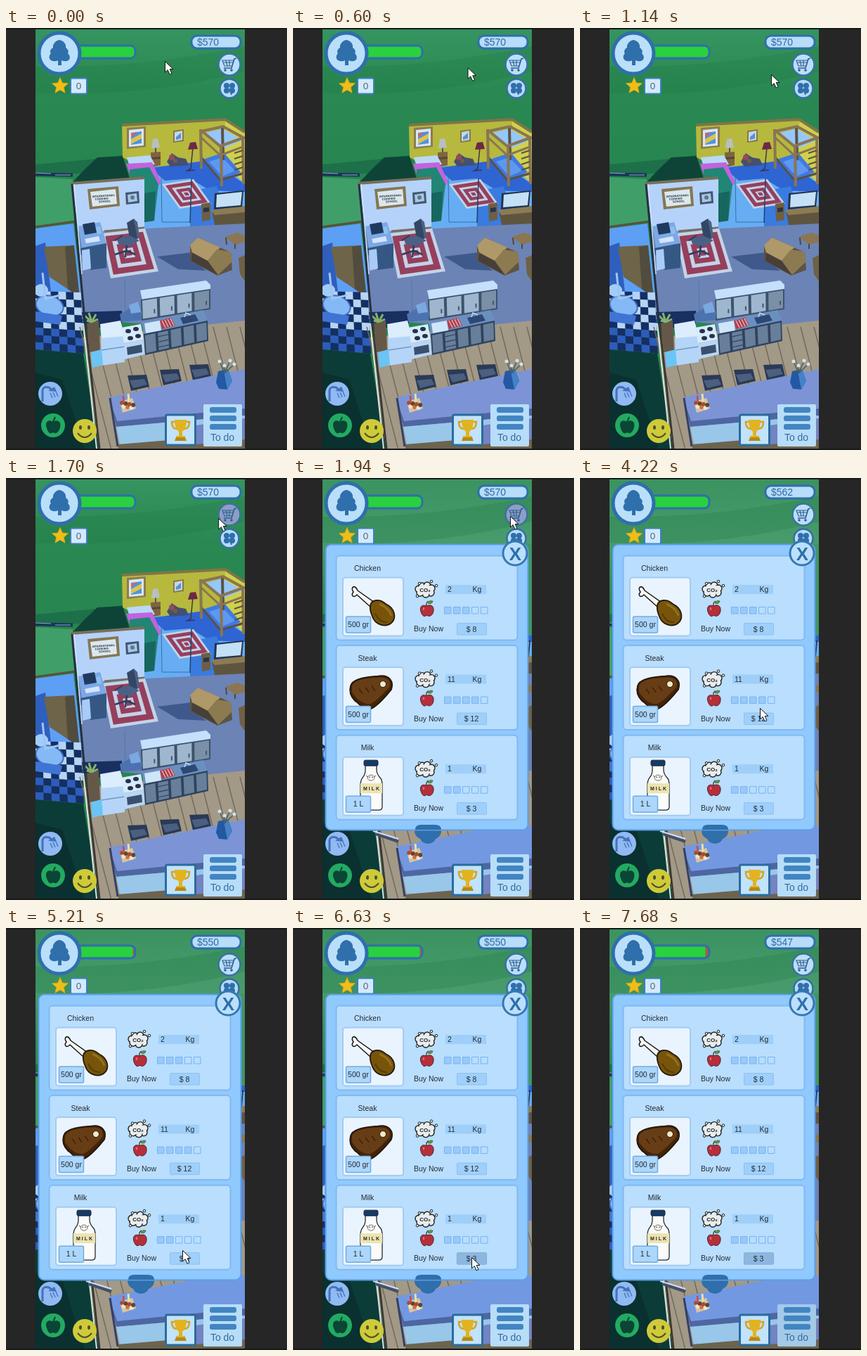
These frames come from a looping animation (400 px wide and 600 px high, 8200 ms). An HTML page with a canvas:

```html
<!DOCTYPE html>
<html lang="en">
<head>
<meta charset="utf-8">
<title>House shop</title>
<style>
html, body { margin: 0; width: 100%; height: 100%; overflow: hidden; background: #262626; }
canvas { display: block; width: 400px; height: 600px; }
</style>
</head>
<body>
<canvas id="stage" width="400" height="600"></canvas>
<script>
const c = document.getElementById('stage').getContext('2d');
const LOOP = 8200, OPEN_AT = 1850;
const BLUE = '#2f6fab', PALE = '#b7ddfb';

// --- drawing helpers ---
function poly(fill, ...p) {
  c.beginPath();
  for (let i = 0; i < p.length; i += 2) c.lineTo(p[i], p[i + 1]);
  c.closePath();
  c.fillStyle = fill;
  c.fill();
}
function line(color, width, ...p) {
  c.beginPath();
  for (let i = 0; i < p.length; i += 2) c.lineTo(p[i], p[i + 1]);
  c.strokeStyle = color;
  c.lineWidth = width;
  c.stroke();
}
function paint(fill, stroke, width) {
  if (fill) { c.fillStyle = fill; c.fill(); }
  if (stroke) { c.strokeStyle = stroke; c.lineWidth = width; c.stroke(); }
}
function box(x, y, w, h, r, fill, stroke, width) {
  c.beginPath();
  c.roundRect(x, y, w, h, r);
  paint(fill, stroke, width);
}
function oval(x, y, rx, ry, fill, stroke, width, turn = 0) {
  c.beginPath();
  c.ellipse(x, y, rx, ry, turn, 0, 7);
  paint(fill, stroke, width);
}
const disc = (x, y, r, fill, stroke, width) => oval(x, y, r, r, fill, stroke, width);
function shape(d, fill, stroke, width) {
  const p = new Path2D(d);
  if (fill) { c.fillStyle = fill; c.fill(p); }
  if (stroke) { c.strokeStyle = stroke; c.lineWidth = width; c.stroke(p); }
}
function text(s, x, y, size, color = '#252b33', align = 'left', weight = '') {
  c.font = `${weight} ${size}px "Liberation Sans", Arial, sans-serif`;
  c.textAlign = align;
  c.fillStyle = color;
  c.fillText(s, x, y);
}
// Maps the unit square onto a four-cornered face: corners clockwise from top left.
function face(ax, ay, bx, by, cx, cy, dx, dy) {
  const at = (u, v) => [
    (1 - v) * (ax + (bx - ax) * u) + v * (dx + (cx - dx) * u),
    (1 - v) * (ay + (by - ay) * u) + v * (dy + (cy - dy) * u)];
  return (fill, u0 = 0, v0 = 0, u1 = 1, v1 = 1) =>
    poly(fill, ...at(u0, v0), ...at(u1, v0), ...at(u1, v1), ...at(u0, v1));
}
function rug(f) {
  ['#c3d3e8', '#963f5c', '#c3d3e8', '#963f5c', '#c3d3e8', '#8f4160']
    .forEach((col, i) => { const k = [0, .07, .2, .28, .39, .44][i]; f(col, k, k, 1 - k, 1 - k); });
}

// --- the house ---
function lawn(open) {
  const g = c.createLinearGradient(0, 2, 0, 210);
  g.addColorStop(0, open ? '#3b9360' : '#369460');
  g.addColorStop(.42, open ? '#489b6c' : '#2a8852');
  g.addColorStop(1, '#278550');
  c.fillStyle = g;
  c.fillRect(42, 2, 298, 596);
  shape('M42 55Q190 58 340 26V62Q190 100 42 92Z', 'rgba(28,115,65,.25)');
  poly('#1d7049', 42, 194, 118, 187, 166, 181, 172, 206, 42, 208);
  poly('#0e4437', 111, 202, 130, 184, 166, 182, 176, 214, 95, 219);
  poly('#409f68', 42, 212, 95, 215, 98, 274, 42, 281);
  line('#1c3558', 5, 42, 208, 95, 209);
  line('#8faec9', 1, 42, 206, 64, 207);
  line('#8faec9', 1, 70, 209, 92, 209);
}
function bedroom() {
  poly('#b6b93d', 165, 138, 312, 130, 312, 196, 208, 206, 166, 184);
  poly('#d0d04d', 312, 130, 340, 148, 340, 235, 312, 200);
  line('#7f7547', 4, 165, 138, 312, 130, 340, 148);
  poly('#67adf3', 204, 197, 310, 193, 340, 222, 340, 285, 194, 288, 194, 212);
  poly('#2f64d3', 205, 199, 290, 188, 340, 222, 340, 233, 290, 231, 262, 214, 226, 217);
  poly('#3a7be0', 262, 232, 300, 225, 318, 282, 262, 282);
  rug(face(222, 222, 267, 215, 292, 250, 247, 257));
  // pictures
  poly('#8d7c50', 172, 142, 199, 140, 199, 169, 172, 172);
  poly('#d9e7f5', 175, 145, 196, 143, 196, 167, 175, 169);
  poly('#4d94dc', 178, 149, 193, 147, 193, 164, 178, 166);
  poly('#e0c24e', 178, 158, 193, 150, 193, 157, 178, 165);
  poly('#d76459', 178, 150, 187, 148, 178, 156);
  poly('#89794c', 238, 146, 253, 144, 253, 161, 238, 163);
  poly('#c5d7e6', 240, 148, 251, 146, 251, 159, 240, 161);
  poly('#5794cb', 242, 155, 249, 149, 249, 157, 242, 159);
  // lamps, night stand and toys
  poly('#7d6440', 206, 177, 220, 176, 220, 195, 207, 198);
  poly('#594733', 207, 184, 220, 183, 220, 186, 207, 187);
  line('#4d5560', 2, 213, 170, 213, 177);
  poly('#b9bfc0', 209, 158, 216, 157, 219, 170, 207, 171);
  line('#3b3550', 1.5, 266, 170, 263, 200, 258, 203, 269, 202);
  poly('#6e2845', 262, 163, 270, 162, 273, 172, 259, 173);
  poly('#43506e', 229, 190, 236, 178, 245, 184, 256, 186, 260, 195, 234, 197);
  disc(236, 184, 4, '#944a5b');
  disc(241, 189, 3, '#785a42');
  // bed
  poly('#b9d8f7', 172, 184, 205, 181, 212, 194, 176, 197);
  poly('#c263df', 171, 193, 208, 191, 221, 219, 215, 227, 205, 203, 176, 208);
  poly('#218675', 176, 201, 204, 198, 217, 222, 211, 274, 197, 276, 197, 214, 176, 210);
  poly('#17665f', 197, 235, 213, 232, 211, 274, 197, 276);
  line('#3272a8', 1, 221, 210, 222, 276, 262, 276);
  line('#23406a', 1.5, 264, 215, 262, 277);
  // bunk bed
  poly('#95c7fa', 281, 150, 308, 143, 336, 160, 309, 172);
  poly('#3f79e2', 280, 187, 310, 177, 334, 205, 305, 218);
  poly('#5e98ef', 289, 190, 308, 184, 326, 203, 308, 211);
  const wood = '#8a7552', dark = '#5b5145';
  line(dark, 4, 308, 141, 309, 188);
  line(wood, 4, 277, 145, 305, 168, 338, 156, 309, 140, 277, 147);
  line(wood, 3, 278, 156, 305, 181, 337, 169);
  line(dark, 3, 278, 184, 305, 216, 337, 207);
  for (const [x, y, b] of [[277, 144, 200], [306, 166, 225], [337, 154, 222]]) line(wood, 4, x, y, x + 1, b);
  for (let y = 178; y < 216; y += 8) line(dark, 2, 325, y, 337, y - 4);
  // television
  poly('#5f553f', 293, 261, 340, 255, 340, 279, 298, 284);
  poly('#8c7b53', 291, 259, 340, 253, 340, 262, 297, 266);
  poly('#22334c', 297, 235, 338, 231, 336, 254, 296, 258);
  poly('#c4e0f7', 300, 237, 336, 233, 334, 252, 299, 255);
  poly('#6d5f45', 278, 250, 291, 248, 291, 273, 279, 275);
  poly('#26354b', 281, 256, 289, 255, 289, 261, 281, 262);
}
function bathroom() {
  poly('#5d9ff5', 42, 285, 96, 278, 108, 385, 42, 390);
  poly('#2f5fbd', 42, 310, 56, 305, 65, 385, 42, 390);
  line('#5c5139', 3, 42, 283, 98, 275);
  poly('#6d6449', 54, 311, 96, 309, 104, 382, 62, 354);
  poly('#514c3e', 84, 311, 97, 309, 105, 384, 88, 371);
  const floor = face(42, 374, 107, 376, 111, 463, 42, 457);
  for (let i = 0; i < 6; i++) for (let j = 0; j < 8; j++)
    floor((i + j) % 2 ? (j > 4 ? '#2d5cbd' : '#b7d4f4') : '#152e63', i / 6, j / 8, (i + 1) / 6, (j + 1) / 8);
  oval(62, 395, 20, 14, '#85b9f5', '#456fc0', 2, .3);
  poly('#3f74d4', 42, 403, 80, 409, 77, 422, 42, 417);
  oval(50, 373, 10, 9, '#a3cdf9');
  line('#9cc6f3', 3, 52, 348, 56, 385, 77, 380);
  poly('#0c3c38', 42, 457, 110, 463, 132, 598, 42, 598);
  poly('#0a302f', 42, 490, 80, 500, 112, 598, 42, 598);
}
function office() {
  poly('#6c83b6', 104, 290, 340, 278, 340, 432, 108, 414);
  poly('#40598c', 215, 325, 265, 319, 270, 333, 285, 345, 245, 343);
  poly('#b5d3fa', 93, 221, 197, 213, 197, 287, 104, 290);
  line('#77705c', 4, 92, 221, 197, 213);
  line('#77705c', 3, 140, 289, 197, 284);
  poly('#857753', 116, 229, 160, 225, 162, 253, 119, 258);
  poly('#dce8ef', 120, 233, 156, 229, 158, 250, 123, 254);
  c.save();
  c.translate(139, 240);
  c.rotate(-.07);
  text('INTERNATIONAL', 0, 0, 4, '#1e2b35', 'center', 'bold');
  text('COOKING', -3, 4, 4, '#1e2b35', 'center', 'bold');
  text('SCHOOL', 1, 8, 4, '#1e2b35', 'center', 'bold');
  c.restore();
  poly('#435772', 170, 234, 189, 232, 190, 249, 171, 251);
  poly('#a8c7e1', 173, 237, 186, 235, 187, 246, 174, 248);
  disc(180, 241, 3, '#5c7894');
  rug(face(136, 292, 198, 285, 217, 346, 149, 356));
  // desk
  poly('#7ca8e6', 103, 282, 134, 276, 143, 306, 108, 313);
  poly('#355784', 106, 313, 143, 306, 143, 341, 120, 344, 117, 320, 107, 323);
  poly('#a8cbf7', 108, 316, 119, 314, 121, 342, 109, 345);
  poly('#20395f', 109, 279, 126, 276, 129, 291, 112, 294);
  poly('#d3e5fa', 112, 300, 132, 296, 134, 303, 114, 306);
  poly('#8dc0ee', 128, 283, 134, 282, 136, 292, 130, 293);
  // desk chair
  poly('#334665', 172, 277, 182, 271, 188, 299, 177, 304);
  poly('#4b6183', 182, 271, 187, 276, 190, 297, 187, 300);
  poly('#4a6186', 158, 300, 175, 295, 190, 302, 175, 311, 160, 307);
  line('#2d3d5b', 2.5, 172, 309, 171, 317, 155, 322);
  line('#2d3d5b', 2.5, 184, 322, 171, 316, 170, 326);
  line('#2d3d5b', 2, 155, 302, 166, 295);
  // armchair and tables
  poly('#5c5444', 262, 310, 273, 298, 320, 319, 322, 344, 301, 352, 262, 331);
  poly('#b09968', 262, 309, 273, 298, 305, 312, 295, 322, 287, 331, 265, 319);
  poly('#8c7a51', 287, 331, 300, 315, 320, 318, 322, 332, 302, 351);
  poly('#473f38', 265, 320, 287, 331, 301, 351, 264, 331);
  poly('#8a7650', 312, 297, 329, 291, 340, 295, 340, 304, 326, 308);
  line('#51483a', 2, 313, 298, 314, 308);
  line('#51483a', 2, 326, 307, 326, 314);
  poly('#6f6145', 331, 327, 340, 323, 340, 360, 333, 350);
}
function kitchen(open) {
  // planks
  const floor = face(110, 440, 340, 416, 340, 600, 132, 600);
  floor('#a39987');
  for (let x = 110; x < 350; x += 19) line('#736a5e', 1.5, x - 5, 425, x + 40, 600);
  poly('#182f60', 108, 404, 165, 402, 165, 420, 112, 430);
  // wall cupboards
  poly('#c4e0fc', 191, 373, 285, 359, 291, 365, 291, 373, 194, 387);
  const cupboard = face(192, 386, 291, 371, 291, 400, 193, 416);
  cupboard('#3e526d');
  for (let i = 0; i < 4; i++) cupboard(i === 3 ? '#7990a6' : '#9eb7cf', i / 4 + .02, .06, i / 4 + .23, .93);
  for (let i = 0; i < 4; i++) cupboard('#40566f', i / 4 + .18, .55, i / 4 + .2, .75);
  line('#4f79ae', 1, 169, 358, 170, 408);
  poly('#4c73af', 162, 407, 179, 397, 194, 404, 193, 415, 164, 418);
  poly('#7aa9e2', 175, 394, 188, 389, 192, 404, 178, 406);
  // worktop and units
  poly('#dcedfe', 134, 421, 163, 416, 169, 439, 136, 445);
  poly('#b4d5f8', 135, 441, 169, 438, 169, 475, 136, 480);
  line('#7199c4', 1.5, 136, 458, 169, 453);
  poly('#d8eafa', 164, 426, 192, 421, 196, 443, 168, 448);
  for (const [x, y] of [[174, 431], [185, 428], [177, 441], [188, 438]]) oval(x, y, 4, 3, '#24334d');
  poly('#b9d6f2', 168, 448, 196, 443, 198, 464, 169, 471);
  poly('#3a506f', 172, 454, 193, 450, 194, 461, 173, 465);
  poly('#6a90c1', 193, 418, 281, 401, 287, 416, 196, 435);
  const unit = face(196, 435, 287, 416, 288, 445, 198, 465);
  unit('#2f435d');
  for (let i = 0; i < 5; i++) unit('#687f9b', i / 5 + .02, .08, i / 5 + .18, .92);
  for (let i = 1; i < 4; i++) unit('#2f435d', .22, i * .25, .38, i * .25 + .04);
  poly('#cfe6fa', 197, 420, 219, 416, 221, 430, 199, 434);
  poly('#b43f4d', 219, 416, 235, 412, 241, 423, 222, 428);
  for (let i = 0; i < 4; i++) line('#edf1ee', 1, 222 + i * 4, 416 - i, 227 + i * 4, 426 - i);
  poly('#2d4873', 248, 412, 269, 407, 274, 416, 252, 421);
  line('#bed6ee', 1.5, 254, 411, 256, 405, 263, 408);
  // plant, box and outer wall
  poly('#665848', 115, 420, 132, 416, 134, 458, 119, 461);
  poly('#6bc4f6', 121, 461, 136, 457, 138, 479, 123, 483);
  for (const [x, y] of [[112, 409], [118, 405], [128, 407], [131, 414], [115, 416]])
    line('#86b26a', 3, 122, 418, x, y);
  line('#dce5df', 2, 110, 420, 129, 598);
  line('#3b3934', 3, 113, 420, 133, 598);
  line('#253044', 3, 94, 222, 112, 415);
  line('#d0e2f5', 1.5, 97, 222, 108, 350);
  // bar
  if (!open) {
    for (const [x, y] of [[173, 494], [219, 486], [261, 479]]) {
      poly('#2a3a56', x, y, x + 27, y - 1, x + 31, y + 16, x + 5, y + 22);
      poly('#4b6080', x + 3, y + 7, x + 24, y + 5, x + 28, y + 13, x + 8, y + 18);
    }
    poly('#7c94d5', 147, 525, 340, 485, 340, 541, 158, 559);
  } else {
    poly('#7398e2', 147, 524, 262, 501, 340, 494, 340, 541, 158, 559);
    line('#42506e', 4, 118, 506, 150, 517);
    line('#d2dcf0', 2, 114, 502, 150, 513);
  }
  poly('#4d66a4', 147, 526, 158, 559, 340, 541, 340, 551, 157, 567);
  poly('#98c7e9', 157, 567, 340, 551, 340, 578, 162, 592);
  line('#354064', 3, 148, 526, 159, 595);
  poly('#6d634f', 160, 592, 340, 577, 340, 598, 160, 598);
  poly('#7383c3', 270, 565, 340, 555, 340, 585, 270, 592);
  // snack basket
  poly('#d7c5a0', 162, 531, 180, 526, 185, 541, 166, 547);
  for (let i = 0; i < 7; i++)
    disc(165 + i * 2.7, 533 + (i * 5 % 9), 3, ['#a84a3b', '#ede4cb', '#594734', '#d36f3c'][i % 4]);
  line('#ca4b44', 2.5, 167, 523, 168, 533);
  line('#eadf9f', 3, 174, 520, 175, 531);
  if (!open) {
    poly('#2458a3', 302, 488, 316, 485, 322, 502, 315, 514, 303, 513, 299, 504);
    poly('#4481c9', 310, 488, 316, 485, 322, 502, 315, 514);
    for (const [x, y] of [[304, 474], [311, 480], [319, 473], [325, 478]]) {
      line('#475f65', 1.5, 311, 491, x, y);
      disc(x, y, 2.5, '#d3e3e9');
    }
  }
}
function house(open) {
  lawn(open);
  bedroom();
  bathroom();
  office();
  kitchen(open);
  if (open) poly('#419664', 333, 94, 340, 94, 340, 224, 333, 224);
}

// --- screen controls ---
function hud(s) {
  box(100, 25, 84, 18, 7, '#a65d43');
  box(100, 25, s.bar - 100, 18, [7, 4, 4, 7], '#29d13f');
  box(100, 25, 84, 18, 7, null, BLUE, 3);
  disc(76, 36, 29, '#b9dffa', BLUE, 5);
  shape('M76 17C70 18 66 24 67 28C63 30 62 34 64 36C60 40 61 46 67 47Q71 48 74 46V53H79V46Q86 49 90 45C92 41 90 38 88 36C90 33 88 30 85 28C86 23 82 18 76 17Z', BLUE);
  box(264, 11, 70, 18, 8, PALE, BLUE, 3);
  text('$' + s.money, 272, 25, 14, '#326a9e');

  disc(318, 52, 15.5, s.cart ? '#8c9fc3' : '#badffa', '#3b70a2', 2.5);
  line('#315f92', 1.7, 328, 43, 325, 44, 321, 57, 310, 57);
  shape('M325 46H308L311 54H322M310 49H324M313 46L315 54M318 46V54', null, '#315f92', 1.2);
  disc(312, 60, 1.8, '#315f92');
  disc(321, 60, 1.8, '#315f92');
  disc(318, 86, 13.5, '#b5dbf8', '#356fa4', 2.5);
  for (const [x, y] of [[314, 82], [322, 82], [314, 89], [322, 89]]) disc(x, y, 4, BLUE);
  line(BLUE, 2, 318, 86, 321, 95);

  c.beginPath();
  for (let i = 0; i < 10; i++) {
    const a = i * Math.PI / 5 - Math.PI / 2, r = i % 2 ? 5.5 : 12;
    c.lineTo(77 + r * Math.cos(a), 82.5 + r * Math.sin(a));
  }
  c.closePath();
  paint('#efbe18', '#d5a417', 1);
  box(92, 71.5, 23, 22, 2, '#d3eafd', '#3b80bd', 2);
  text('0', 103.5, 87, 13.5, '#53697c', 'center');

  disc(63, 520, 17, '#91b9f3');
  shape('M52 531V515Q53 509 61 511L65 514', null, '#4373ba', 3);
  poly('#4373ba', 60, 516, 69, 510, 72, 517);
  for (let i = 0; i < 3; i++) line('#4373ba', 1.3, 63 + i * 4, 519 - i, 66 + i * 4, 526 - i);
  disc(67, 565, 17, '#23aa62');
  shape('M67 560C59 555 55 562 58 569C61 578 64 577 67 575C71 578 75 575 77 568C79 559 73 556 67 560Z', '#0b4535');
  line('#0b4535', 2, 67, 560, 70, 553);
  disc(112, 573, 17, '#cfca39');
  oval(106, 568, 2, 3, '#4b522b');
  oval(118, 568, 2, 3, '#4b522b');
  shape('M102 576Q112 588 122 576', null, '#4b522b', 2);

  box(227.5, 550, 42, 43, 2, '#c1e3fc', '#2b6c9d', 3);
  shape('M241 560H236Q236 570 244 570M256 560H261Q261 570 253 570', null, '#d6a51f', 2.5);
  shape('M240 557H257Q257 570 251 574V580H255V585H242V580H246V574Q240 569 240 557Z', '#e2b321');
  poly('#b78a17', 242, 582, 255, 582, 257, 587, 240, 587);
  box(281, 535, 55, 60, 2, s.todo ? '#a3cae7' : '#b7ddf8');
  for (let i = 0; i < 3; i++) box(290, 539 + i * 12, 38, 8, 3, '#4285c2');
  text('To do', 308, 587, 14, '#356c9d', 'center');
}

// --- shop ---
function cloud() {
  const puffs = [[179, 158, 5], [184, 154, 5], [191, 153, 5], [197, 157, 5], [196, 163, 5], [189, 165, 5], [181, 163, 5]];
  for (const [x, y, r] of puffs) disc(x, y, r, '#e9edee', '#222', 1.4);
  oval(188, 159, 12, 7, '#e9edee');
  text('CO₂', 188, 162, 8, '#222', 'center', 'bold');
  for (const [x, y] of [[180, 150], [197, 147], [204, 153], [177, 168]]) disc(x, y, 1.8, '#dfe7e9', '#222', 1);
}
function apple() {
  shape('M190 182C183 179 180 184 182 190C184 197 188 198 190 195C194 198 199 196 200 189C201 182 196 179 190 182Z', '#b62f3b', '#4d2330', 1);
  shape('M190 182Q189 177 193 175', null, '#4b3527', 1.3);
  shape('M192 178Q194 173 199 175Q198 180 192 178Z', '#5e9a39', '#355a28', .7);
  oval(186, 186, 1.2, 2, '#da7779');
}
function chicken() {
  shape('M92 160L116 177L111 184L91 166C86 171 82 167 86 162C81 156 88 150 92 160Z', '#f7f7f4', '#171717', 1.5);
  shape('M110 181C112 173 123 171 132 179C145 185 148 199 140 206C132 213 117 209 113 197Q109 188 110 181Z', '#775409', '#22190d', 1.8);
  shape('M123 179Q137 185 140 196', null, '#92701f', 3);
  shape('M117 193Q123 206 134 205', null, '#573c07', 2);
}
function steak() {
  shape('M82 168C84 158 102 155 121 154C137 151 144 162 140 173C132 183 120 197 110 201C98 204 97 194 88 189C81 182 80 175 82 168Z', '#432409', '#24160c', 1.8);
  shape('M84 168C89 158 107 157 123 156C136 155 140 163 137 170C128 179 118 191 109 194C97 194 89 184 84 177Z', '#673d16');
  disc(128, 165.5, 4.5, '#eee7c9', '#34200d', 1);
  for (let i = 0; i < 3; i++) line('#3c210b', 1.5, 94 + i * 9, 172 - i * 2, 99 + i * 9, 179 - i * 2);
}
function milk() {
  shape('M103 153H119V160Q119 166 125 172Q127 175 127 182V212Q127 217 122 217H101Q96 217 96 212V182Q96 175 99 171Q103 166 103 160Z', '#fbfbf9', '#252b30', 1.3);
  box(101, 146, 20, 8, 2, '#173a65', '#152942', 1);
  poly('#ece3b0', 96, 179, 127, 179, 127, 193, 96, 193);
  text('M I L K', 111.5, 189, 7, '#24282b', 'center', 'bold');
  oval(111, 171, 5, 4, '#f6f6f2', '#4d5355', .8);
  disc(109, 170, .8, '#222');
  disc(113, 170, .8, '#222');
  line('#4d5355', 1, 104, 168, 107, 170);
  line('#4d5355', 1, 118, 168, 115, 170);
}
const goods = [
  { name: 'Chicken', weight: '500 gr', co2: 2, level: 3, price: 8, draw: chicken },
  { name: 'Steak', weight: '500 gr', co2: 11, level: 4, price: 12, draw: steak },
  { name: 'Milk', weight: '1 L', co2: 1, level: 2, price: 3, draw: milk }
];
function card(item, i, active) {
  c.save();
  c.translate(0, i * 127.6);
  box(61.5, 110.5, 258, 120, 5, '#b9defe', '#82b9ef', 2);
  text(item.name, 106, 132, 10.5, undefined, 'center');
  box(71, 141.5, 86, 83, 4, '#eaf4fe', '#a2ccf3', 2);
  item.draw();
  box(75.5, 197, 35, 23, 2, '#acd6fb', '#71ace4', 1.5);
  text(item.weight, 93, 212, 10.5, undefined, 'center');
  cloud();
  apple();
  box(217, 152, 58, 13, 0, '#9fcff8');
  text(item.co2, 220, 162, 10.5);
  text('Kg', 255.5, 162, 10.5);
  for (let k = 0; k < 5; k++)
    box(215.5 + k * 13, 183.5, 9.5, 9.5, 0, k < item.level ? '#99c9fa' : '#b9defe', '#79b3ed', 1);
  text('Buy Now', 172, 218, 10.5);
  box(233.5, 206.5, 42, 16.5, 1, active ? '#8db7df' : '#9fcffb', active ? '#81add7' : '#8fc1f0', 1);
  text('$ ' + item.price, 254, 218.5, 10.5, undefined, 'center');
  c.restore();
}
function shop(s) {
  shape('M173 499Q174 493 182 493H202Q211 493 211 500Q212 509 203 513Q201 519 192 520Q183 519 181 513Q172 509 173 499Z', BLUE);
  box(46.5, 94.5, 288, 406, 8, '#90c9fe', '#5b9ee6', 2);
  goods.forEach((item, i) => card(item, i, s.active === i));
  shape('M174 500Q174 493 182 493H202Q211 493 211 500Z', BLUE);
  disc(316, 107, 17, '#bbdffc', '#3578b2', 3);
  text('X', 316.3, 116.5, 26, '#2e6fa9', 'center', 'bold');
}

// --- motion ---
const path = [
  [0, 226, 47], [30, 226, 47], [840, 258, 60], [1140, 272, 66], [1670, 300, 58], [1800, 309, 54],
  [2210, 309, 54], [2500, 278, 135], [2810, 256, 220], [3650, 256, 220], [4280, 256, 338],
  [4560, 256, 338], [5210, 251, 458], [5360, 253, 466], [6330, 253, 467], [6500, 254, 468],
  [7200, 254, 468], [7640, 315, 602], [LOOP, 315, 602]];
function pointer(t) {
  const i = Math.max(1, path.findIndex(p => p[0] > t));
  const [t0, x0, y0] = path[i - 1], [t1, x1, y1] = path[i];
  const k = (t - t0) / (t1 - t0);
  return [x0 + (x1 - x0) * k, y0 + (y1 - y0) * k];
}
function stateAt(t) {
  const step = (...marks) => marks.filter(m => t >= m).length;
  const paid = step(3300, 4580, 6930);
  return {
    open: t >= OPEN_AT,
    money: [570, 562, 550, 547][paid],
    bar: [184, 183, 180.5, 178.5][paid],
    cart: t >= 1700 && t < 2300,
    active: [-1, 0, -1, 1, -1, 2][step(3240, 3740, 4520, 4700, 6330)],
    todo: t >= 7420
  };
}
function frame(now) {
  const t = now % LOOP, s = stateAt(t);
  c.fillStyle = '#262626';
  c.fillRect(0, 0, 400, 600);
  c.save();
  c.beginPath();
  c.rect(42, 2, 298, 596);
  c.clip();
  house(s.open);
  hud(s);
  if (s.open) shop(s);
  c.restore();
  poly('#171b1d', 0, 0, 400, 0, 400, 2, 0, 2);
  poly('#171b1d', 0, 598, 400, 598, 400, 600, 0, 600);
  c.save();
  c.translate(...pointer(t));
  shape('M.5 .5V16L4.2 12.6L7 19L10 17.7L7.2 11.5H12Z', '#fff', '#111', 1);
  c.restore();
  requestAnimationFrame(frame);
}
requestAnimationFrame(frame);
</script>
</body>
</html>
```
